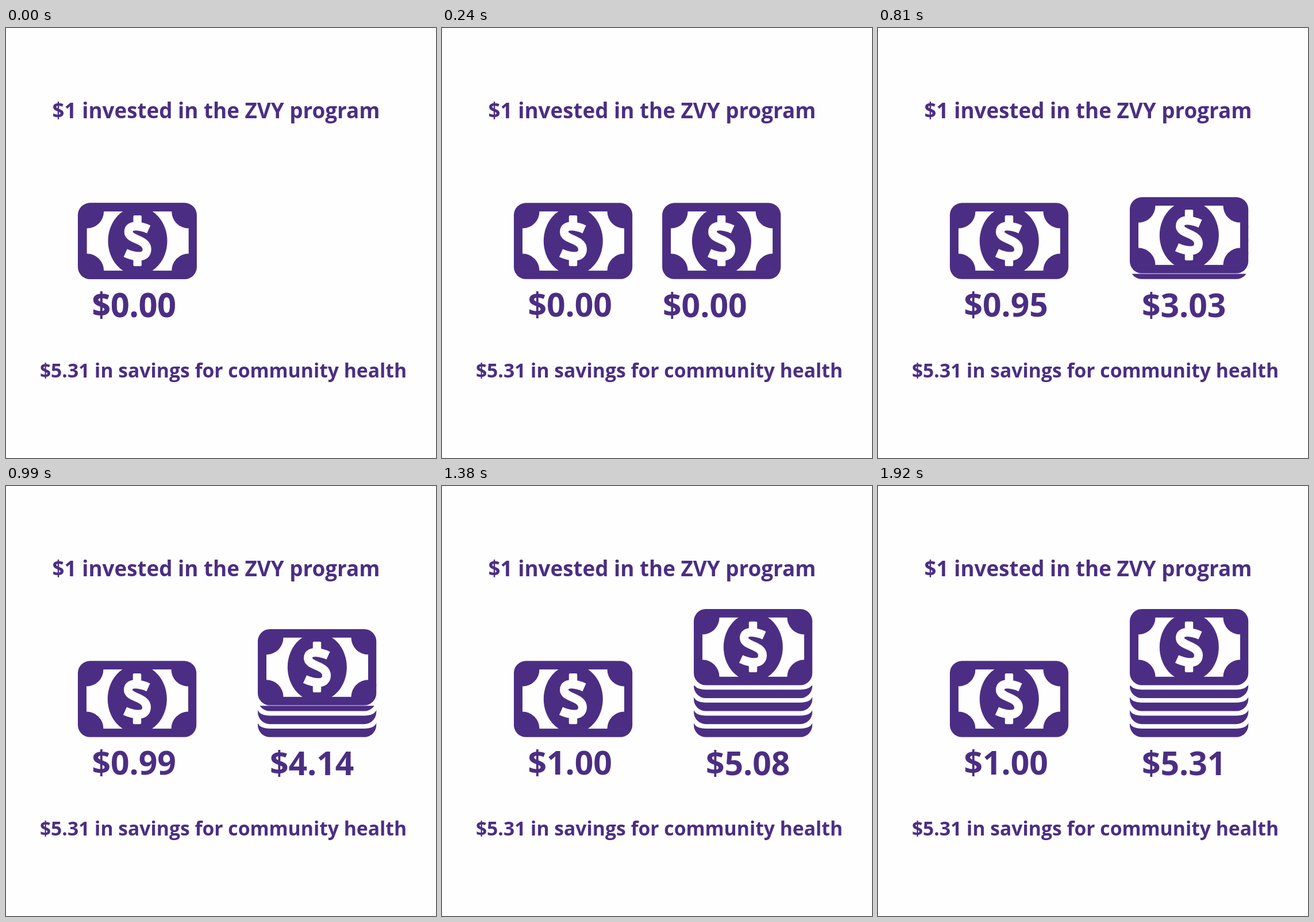
Animation of 748 by 748 pixels, one loop 3920 ms. Source, as an HTML page:

```html
<!DOCTYPE html>
<html lang="en">
<head>
<meta charset="utf-8">
<title>Savings per dollar</title>
<style>
  html, body { margin: 0; width: 100%; height: 100%; overflow: hidden; background: #fefefe; }
  svg { display: block; width: 100%; height: 100%; fill: #4b2e83; }
  text { font-family: "Open Sans", sans-serif; font-weight: 700; }
  .amount { font-size: 57px; }
  .paper { fill: #fefefe; }
</style>
</head>
<body>
<svg viewBox="0 0 748 748">
  <defs>
    <g id="bill">
      <rect width="206.2" height="132.5" rx="21"/>
      <rect class="paper" x="15" y="14.8" width="177" height="103"/>
      <g clip-path="url(#inside)">
        <circle cx="15" cy="14.8" r="29.5"/>
        <circle cx="192" cy="14.8" r="29.5"/>
        <circle cx="15" cy="117.8" r="29.5"/>
        <circle cx="192" cy="117.8" r="29.5"/>
        <ellipse cx="103.3" cy="66.2" rx="51.5" ry="59.5"/>
      </g>
      <rect class="paper" x="95.8" y="21.8" width="14.4" height="20" rx="2"/>
      <rect class="paper" x="95.8" y="90" width="14.4" height="20" rx="2"/>
      <path d="M122.5 46C112.5 41.5 87.5 34.5 87.5 50.5C87.5 64.5 119.5 62.5 119.5 80.5C119.5 97.5 97.5 94 82 87"
            fill="none" stroke="#fefefe" stroke-width="15"/>
    </g>
    <clipPath id="inside"><rect x="14" y="14" width="179" height="104.5"/></clipPath>
    <!-- Lower edge of a stacked bill, with its bottom at y = 0 -->
    <path id="edge" d="M0-24.5Q4-14.8 21-14.8H185.2Q202.2-14.8 206.2-24.5V-21A21 21 0 0 1 185.2 0H21A21 21 0 0 1 0-21Z"/>
  </defs>

  <text x="80.6" y="156.5" font-size="36.8">$1 invested in the ZVY program</text>
  <text x="58.9" y="608" font-size="33.69">$5.31 in savings for community health</text>

  <use href="#bill" x="125" y="304.3"/>
  <text id="invested" class="amount" x="149.4" y="502"></text>

  <g id="stack">
    <g id="edges">
      <use href="#edge" y="436.8"/>
      <use href="#edge" y="414.2"/>
      <use href="#edge" y="391.6"/>
      <use href="#edge" y="369"/>
    </g>
    <g id="top">
      <rect id="cover" class="paper" width="206.2" height="133.3"/>
      <use href="#bill"/>
    </g>
  </g>
  <text id="saved" class="amount" y="502.5"></text>
</svg>
<script>
const LOOP = 3920, LAST_STEP = 1920, STEP = 30;
const [invested, saved, stack, edges, topBill, cover] =
  ["invested", "saved", "stack", "edges", "top", "cover"].map(id => document.getElementById(id));

const progress = (t, start, duration) => Math.min(1, Math.max(0, (t - start) / duration));
const easeOut = (p, power) => 1 - (1 - p) ** power;
const easeInOut = p => (1 - Math.cos(Math.PI * p)) / 2;
const dollars = value => "$" + value.toFixed(2);

// Equals cubic-bezier(.22, 0, 0, 1)
function slideEase(p) {
  let low = 0, high = 1;
  for (let i = 0; i < 30; i++) {
    const s = (low + high) / 2;
    if (0.66 * s * (1 - s) ** 2 + s ** 3 < p) low = s; else high = s;
  }
  return low * low * (3 - 2 * low);
}

function draw(t) {
  const billX = 125 + 313 * slideEase(progress(t, -10, 583));
  const textX = 149.4 + 309.5 * slideEase(progress(t, 31, 580));
  const rise = 90.3 * easeInOut(progress(t, 701, 505));

  stack.setAttribute("transform", `translate(${billX} 0)`);
  topBill.setAttribute("transform", `translate(0 ${304.3 - rise})`);
  edges.style.display = cover.style.display = rise > 0 ? "" : "none";

  invested.textContent = dollars(easeOut(progress(t, 263, 1205), 5));
  saved.textContent = dollars(Math.min(5.31, 5.33 * easeOut(progress(t, 565, 3623), 12)));
  saved.setAttribute("x", textX);
}

function tick() {
  const t = performance.now() % LOOP;
  draw(Math.min(LAST_STEP, Math.floor(t / STEP) * STEP));
  requestAnimationFrame(tick);
}
tick();
</script>
</body>
</html>
```
